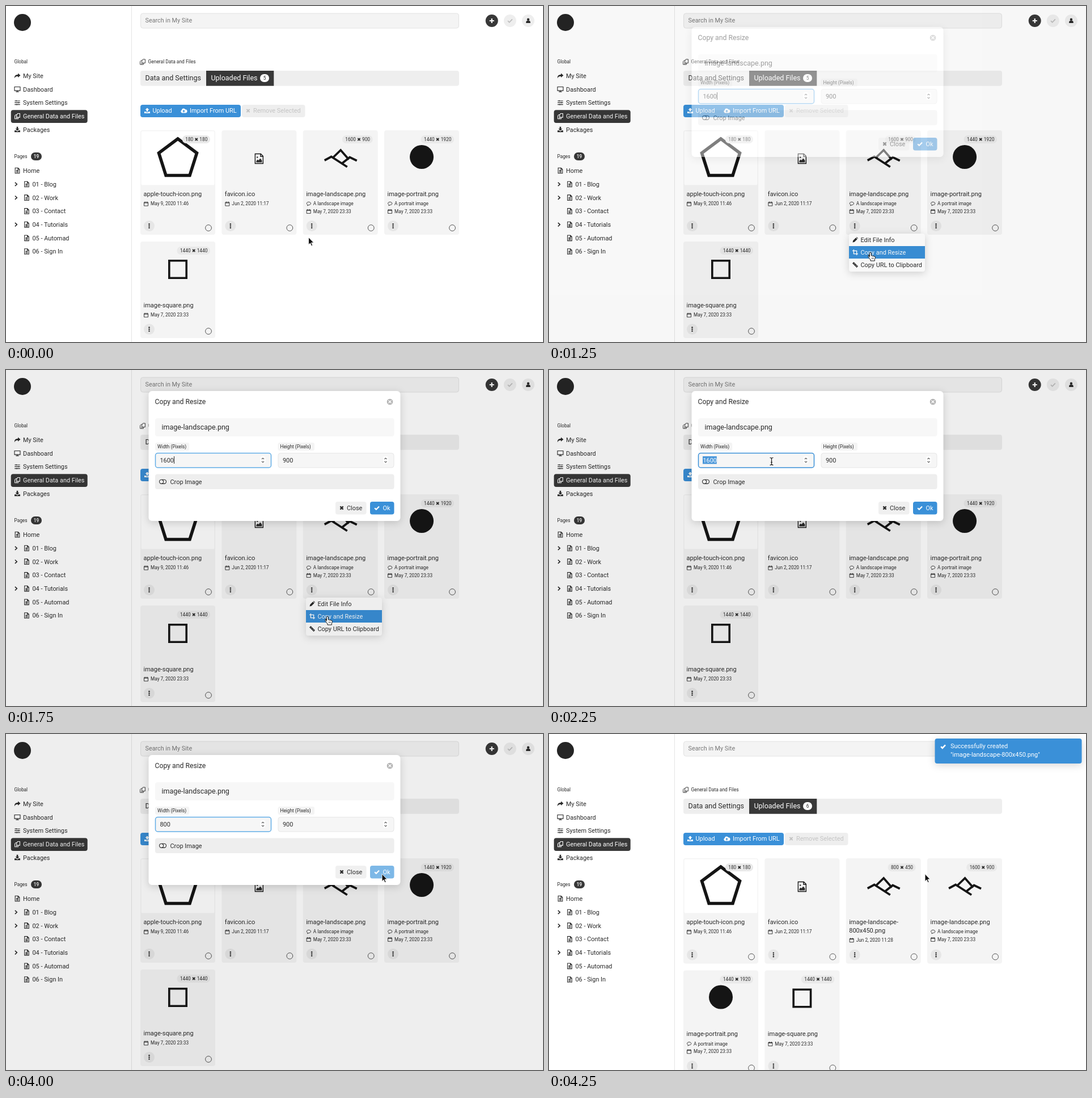
An HTML page that plays this animation: 947x592 px, repeating every 4760 ms.

```html
<!DOCTYPE html>
<html lang="en">
<head>
<meta charset="utf-8">
<title>Copy and resize a file</title>
<style>
  html, body { margin: 0; width: 100%; height: 100%; overflow: hidden; background: #fff; }
  svg { display: block; width: 100vw; height: 100vh; font-family: Roboto, "DejaVu Sans", sans-serif; }
  .lift { filter: drop-shadow(0 3px 7px rgba(0, 0, 0, .16)); }
</style>
</head>
<body>
<svg id="stage" viewBox="0 0 947 592"></svg>
<script>
const LOOP = 4760, STEP = 125;
const INK = '#2a2a2a', DARK = '#383838', BLUE = '#3a90d8', PALE = '#f4f4f4', GREY = '#eeeeee';
const stage = document.getElementById('stage');

// Icon outlines around their own centre; solid ones are filled.
const solid = {
  share: 'M-5 4.5C-5.5 0-3-2 1-2V-4.5L5.5-.8L1 3V.8C-2 .8-4 1.5-5 4.5Z',
  download: 'M-1.3-5H1.3V-1.5H3.5L0 2L-3.5-1.5H-1.3ZM-5 1.5H-2L0 3.5L2 1.5H5V4.5H-5Z',
  upload: 'M-1.3 1.5H1.3V-1.5H3.5L0-5L-3.5-1.5H-1.3ZM-5 1.5H-2.3V2.8H2.3V1.5H5V4.5H-5Z',
  cloud: 'M-3 4A2.8 2.8 0 0 1-3.6-1.3A3.3 3.3 0 0 1 2.6-2.2A3.1 3.1 0 0 1 3.2 4ZM0-1.6L-2.3 1H-.8V2.8H.8V1H2.3Z',
  person: 'M-3.8 4V2.4Q-3.8 0-1.5 0H1.5Q3.8 0 3.8 2.4V4ZM0-4.4A2.2 2.2 0 0 1 0 0A2.2 2.2 0 0 1 0-4.4Z',
  pencil: 'M-4.5 4.5L-3.8 1.3L1.2-3.7L3.7-1.2L-1.3 3.8ZM1.9-4.4L2.8-5L5 -2.8L4.4-1.9Z'
};
const line = {
  monitor: 'M-5-4.2H5V2.4H-5ZM-2.6 4.4H2.6M0 2.4V4.4',
  sliders: 'M-4.8-3.2H4.8M-4.8 0H4.8M-4.8 3.2H4.8M-2-4.3V-2.1M2-1.1V1.1M-1 2.1V4.3',
  copy: 'M-1.4-1.6L.4-4.6H4.4V2H-1.4ZM-1.4 4.6H-4.4V-.6L-2.6-2.6H-1.2M-1.4 2V4.6H1.4V2',
  page: 'M-3.8-4.8H1.2L3.8-2.2V4.8H-3.8ZM1-4.6V-2H3.6M-2-.4H2M-2 1.3H2M-2 3H2',
  calendar: 'M-3.5-2.6H3.5V3.6H-3.5ZM-3.5-1.5H3.5M-1.8-3.9V-2M1.8-3.9V-2',
  comment: 'M-2.2 3.3L-1.6 1.9C-5-.2-3.2-3.2 0-3.2C5-3.2 5 2 .2 2.1Z',
  crop: 'M-2.6-5V2.6H5M-5-2.6H2.6V5',
  link: 'M-4-2.6L-2.6-4L.6-.8L-.8 .6ZM-.6 .8L.8-.6L4 2.6L2.6 4Z',
  chevron: 'M-1.6-3.2L1.8 0L-1.6 3.2',
  check: 'M-3.8 .2L-1.2 2.8L4-2.6',
  cross: 'M-2.6-2.6L2.6 2.6M-2.6 2.6L2.6-2.6',
  plus: 'M-4 0H4M0-4V4',
  toggle: 'M-2.4-3.6H2.4A3.6 3.6 0 0 1 2.4 3.6H-2.4A3.6 3.6 0 0 1-2.4-3.6A3.6 3.6 0 0 1-2.4 3.6',
  spin: 'M-2-1.8L0-3.8L2-1.8M-2 1.8L0 3.8L2 1.8'
};

const rect = (x, y, w, h, fill, r = 4, more = '') =>
  `<rect x="${x}" y="${y}" width="${w}" height="${h}" rx="${r}" fill="${fill}" ${more}/>`;
const disc = (x, y, r, fill, more = '') => `<circle cx="${x}" cy="${y}" r="${r}" fill="${fill}" ${more}/>`;
const path = (d, width, color = '#151515') => `<path d="${d}" fill="none" stroke="${color}" stroke-width="${width}"/>`;
const at = (x, y, body) => `<g transform="translate(${x} ${y})">${body}</g>`;
const group = (body, opacity = 1, more = '') => `<g opacity="${opacity}" ${more}>${body}</g>`;
// Text is placed by the middle of its capitals.
const text = (x, y, s, size = 10.9, fill = INK, more = '') =>
  `<text x="${x}" y="${y + size * .355}" font-size="${size}" fill="${fill}" ${more}>${s}</text>`;
const icon = (name, x, y, color = INK, width = 1.1) => at(x, y, solid[name]
  ? `<path d="${solid[name]}" fill="${color}" fill-rule="evenodd"/>` : path(line[name], width, color));

function sidebar() {
  const main = [['share', 'My Site'], ['monitor', 'Dashboard'], ['sliders', 'System Settings'],
    ['copy', 'General Data and Files'], ['download', 'Packages']];
  const pages = ['01 - Blog', '02 - Work', '03 - Contact', '04 - Tutorials', '05 - Automad', '06 - Sign In'];
  return rect(221, 0, 1, 592, '#e4e4e4', 0) + disc(29, 29, 15, '#252525')
    + text(14.5, 98, 'Global', 8.3) + rect(8.7, 183.3, 135, 22.7, DARK)
    + main.map(([name, label], i) => {
      const y = 123 + i * 23.7, color = i === 3 ? '#fff' : INK;
      return icon(name, 20, y, color) + text(30, y, label, 10.9, color);
    }).join('')
    + text(14.5, 265, 'Pages', 8.3) + rect(44, 258, 19, 14, DARK, 7)
    + text(53.5, 265, '19', 8.2, '#fff', 'text-anchor="middle" font-weight="500"')
    + icon('page', 20, 290) + text(30, 290, 'Home')
    + pages.map((label, i) => {
      const y = 314 + i * 23.7;
      return (/Blog|Work|Tutorials/.test(label) ? icon('chevron', 17.5, y, INK, 1.6) : '')
        + icon('page', 36.5, y) + text(46.5, y, label);
    }).join('');
}

function header(count) {
  return rect(237.5, 13, 561, 26, PALE, 4, 'stroke="#e2e2e2"') + text(245.5, 25.5, 'Search in My Site', 10.8, '#777')
    + disc(856.7, 26, 11, DARK) + icon('plus', 856.7, 26, '#fff', 2.2)
    + disc(888.8, 26, 11, GREY) + icon('check', 888.8, 26, '#bdbdbd', 1.8)
    + disc(920.9, 26, 11, GREY) + icon('person', 920.9, 26)
    + icon('copy', 241, 98.5, INK, .9) + text(250.5, 98.5, 'General Data and Files', 8.45)
    + rect(237, 114, 562, 26.7, GREY) + text(245.5, 127, 'Data and Settings', 12.5)
    + rect(353, 114, 119.3, 26.7, DARK, 0) + text(361.5, 127, 'Uploaded Files', 12.5, '#fff')
    + rect(448, 120, 16, 14, '#fff', 7) + text(456, 127.3, count, 8.4, INK, 'text-anchor="middle"')
    + rect(237, 174, 177, 22, BLUE) + icon('upload', 249, 184.5, '#fff') + text(258.5, 184.5, 'Upload', 10.9, '#fff')
    + icon('cloud', 313.5, 184.5, '#fff') + text(324, 184.5, 'Import From URL', 10.9, '#fff')
    + rect(416, 174, 111.5, 22, GREY) + icon('cross', 427, 184.5, '#c2c2c2', 2)
    + text(436, 184.5, 'Remove Selected', 10.9, '#c4c4c4');
}

// Thumbnails, drawn relative to the card's corner.
const thumbs = {
  pentagon: rect(1.5, 1.5, 129, 95, '#fff', 2) + path('M66 15L99.5 40L87 79.5H45L32.5 40Z', 5.6),
  icon: path('M59 41.5H69L73 45.5V58.5H59ZM68.5 42V46H72.5', 1.4)
    + `<path d="M61 56.5V54L63.5 51.5L65 53L68 49.5L71 53V56.5Z" fill="${INK}"/>` + disc(62.8, 47.5, 1.3, INK),
  landscape: path('M38 53L50 46.5L78 64.5M53 48L66.5 35L81 51.5M68 59L82.5 47.5L95 53.5', 3.7),
  portrait: disc(66, 47, 21, '#151515'),
  square: path('M50.8 33.8H81.2V64.2H50.8Z', 3.6)
};

const FILES = [
  { thumb: 'pentagon', dims: [180, 180], name: ['apple-touch-icon.png'], date: 'May 9, 2020 11:46' },
  { thumb: 'icon', name: ['favicon.ico'], date: 'Jun 2, 2020 11:17' },
  { thumb: 'landscape', dims: [1600, 900], name: ['image-landscape.png'], note: 'A landscape image', date: 'May 7, 2020 23:33' },
  { thumb: 'portrait', dims: [1440, 1920], name: ['image-portrait.png'], note: 'A portrait image', date: 'May 7, 2020 23:33' },
  { thumb: 'square', dims: [1440, 1440], name: ['image-square.png'], date: 'May 7, 2020 23:33' }
];
const RESIZED = { thumb: 'landscape', dims: [800, 450], name: ['image-landscape-', '800x450.png'], date: 'Jun 2, 2020 11:28' };

function card(file, x, y, h) {
  let body = rect(0, 0, 132, h, PALE) + thumbs[file.thumb];
  if (file.dims) {
    const w = 21 + 4.7 * file.dims.join('').length;
    body += rect(123 - w, 9, w, 14, '#e9e9e9', 7)
      + text(118.3, 16, file.dims.join(' ✖ '), 8.3, INK, 'text-anchor="end"');
  }
  file.name.forEach((part, i) => body += text(5.5, 112 + i * 14.7, part, 11));
  let row = 129.5 + (file.name.length - 1) * 14.7;
  if (file.note) {
    body += icon('comment', 10, row, INK, .9) + text(18, row, file.note, 8.4);
    row += 13.3;
  }
  body += icon('calendar', 10, row, INK, .9) + text(18, row, file.date, 8.25)
    + disc(15.5, h - 15.5, 9.5, '#e6e6e6') + disc(120, h - 12, 5.4, 'none', 'stroke="#555"');
  for (const dy of [-3.2, 0, 3.2]) body += disc(15.5, h - 15.5 + dy, 1.25, INK);
  return at(x, y, body);
}

function cards(done) {
  const files = done ? [...FILES.slice(0, 2), RESIZED, ...FILES.slice(2)] : FILES;
  const first = done ? 185.5 : 184, second = done ? 184 : 170;
  return files.map((file, i) =>
    card(file, 237 + i % 4 * 143.35, i < 4 ? 219 : 231 + first, i < 4 ? first : second)).join('');
}

function menu(opacity, hover) {
  const rows = [['pencil', 'Edit File Info'], ['crop', 'Copy and Resize'], ['link', 'Copy URL to Clipboard']];
  return group(rect(529, 401, 134, 67, '#fff') + rows.map(([name, label], i) => {
    const y = 412 + i * 22, lit = hover[i] || 0, color = lit > .5 ? '#fff' : INK;
    return rect(529, y - 11, 134, 22, BLUE, 0, `opacity="${lit}"`)
      + icon(name, 540, y, color, 1.4) + text(549.5, y, label, 10.9, color);
  }).join(''), opacity, 'class="lift"');
}

function field(x, label, value, border) {
  const w = label.length * 4.3;
  return rect(x, 128, w, 14, PALE, 3) + text(x + 4, 135.5, label, 8.3)
    + rect(x + .5, 146.5, 204, 25.5, '#f6f6f6', 4, border)
    + value + rect(x + 185.5, 152, 9, 13, '#fff', 3) + icon('spin', x + 190, 159, '#444', 1.1);
}

function modal(k) {
  const width = k < 22 ? '1600' : k < 24 ? '8' : '800';
  const selected = k >= 18 && k < 22, caret = k >= 10 && k < 26 && !selected;
  const hovered = k >= 17 && k < 27;
  const end = 271.5 + width.length * 6.13;
  const value = (selected ? rect(271, 152, 24.8, 13.5, '#4a97da', 0) : '')
    + text(271.5, 158.8, width, 10.9, selected ? '#fff' : INK)
    + (caret ? rect(end, 152, 1, 13, INK, 0) : '');
  const focus = `stroke="${hovered ? BLUE : '#62ade6'}" stroke-width="1.5"`;
  return group(rect(251.5, 37, 444, 229, '#fff', 6), 1, 'class="lift"')
    + text(262.5, 55.5, 'Copy and Resize', 12.25)
    + disc(677, 56, 5.3, '#b3b3b3') + icon('cross', 677, 56, '#fff', 1.4)
    + rect(263, 85, 421.5, 32, '#f7f7f7') + text(274.5, 101, 'image-landscape.png', 12.5)
    + field(263, 'Width (Pixels)', value, focus)
    + field(479.5, 'Height (Pixels)', text(488, 158.8, '900'), 'stroke="#e6e6e6"')
    + rect(263, 183.5, 421.5, 26.5, GREY) + icon('toggle', 276.5, 196.8) + text(289.5, 196.8, 'Crop Image')
    + rect(581, 232, 54.5, 22.5, '#f0f0f0') + icon('cross', 592, 243, INK, 2.2) + text(601, 243, 'Close')
    + rect(642, 232, 42.5, 22.5, k < 32 ? BLUE : '#7db8e7')
    + icon('check', 654, 243, '#fff', 2.2) + text(664.5, 243, 'Ok', 10.9, '#fff');
}

const toast = () => group(rect(680.5, 8, 259, 44, BLUE), 1, 'class="lift"') + icon('check', 695, 22, '#fff', 2.6)
  + text(708, 21.5, 'Successfully created', 11, '#fff') + text(708, 36.5, '"image-landscape-800x450.png"', 11, '#fff');

const pointers = {
  arrow: '<path d="M0 0V13.2L3 10.4L5.1 15.2L7.2 14.3L5.1 9.6H9.2Z" fill="#111" stroke="#fff" stroke-width=".9"/>',
  hand: '<path d="M-1.5 1Q0-.9 1.3 1V6L6.5 7Q8.6 7.4 8.4 9.5L7.3 12.5V15H0V13L-3.8 8.6Q-4-.4-1.5 8.4Z" fill="#fff" stroke="#111"/>'
    + path('M2.8 9V12M5 9.3V12', .8),
  beam: path('M-3-6.5Q0-6.5 0-4.5Q0-6.5 3-6.5M0-5V5M-3 6.5Q0 6.5 0 4.5Q0 6.5 3 6.5M-1.5 1.5H1.5', 1.2)
};

// Pointer stops: [first step, last step, x, y of arrival].
const MOVES = [[0, 2, 539, 387], [4, 6, 553.5, 434], [6, 9, 567, 434], [14, 17, 392.5, 161], [26, 30, 663, 246.5]];

function pointer(k) {
  let x = 533.5, y = 407.5;
  for (const [from, to, tx, ty] of MOVES) {
    const p = Math.min(1, Math.max(0, (k - from) / (to - from))), e = p * p * (3 - 2 * p);
    x += (tx - x) * e;
    y += (ty - y) * e;
  }
  if (k >= 22 && k < 27) return '';
  const kind = k >= 2 && k < 15 ? 'hand' : k >= 17 && k < 22 ? 'beam' : 'arrow';
  return at(x, y, pointers[kind]);
}

function draw(k) {
  const done = k >= 34;
  const menuShown = k < 2 ? 0 : k === 2 ? .5 : k < 16 ? 1 : k === 16 ? .4 : 0;
  const hover = k < 5 ? [] : k === 5 ? [1] : [k === 6 ? .1 : 0, k < 16 ? 1 : 0];
  const shown = k < 10 || done ? 0 : k === 10 ? .45 : k === 33 ? .4 : 1;
  return sidebar() + header(done ? 6 : 5) + cards(done)
    + (menuShown ? menu(menuShown, hover) : '')
    + (shown ? group(rect(0, 0, 947, 592, 'rgba(0,0,0,.067)', 0) + modal(k), shown) : '')
    + (done ? toast() : '') + pointer(k);
}

const start = performance.now();
let last = -1;
function tick() {
  const k = Math.floor((performance.now() - start) % LOOP / STEP);
  if (k !== last) stage.innerHTML = draw(last = k);
  requestAnimationFrame(tick);
}
tick();
</script>
</body>
</html>
```
